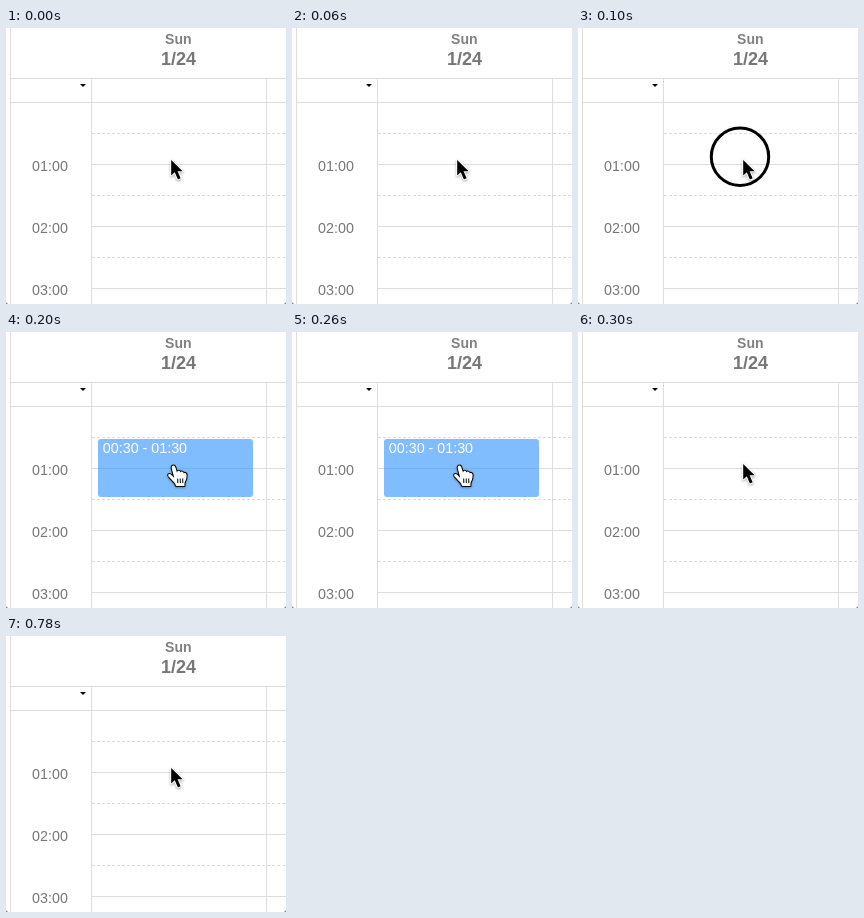
Write an HTML page with a canvas that moves like this. It is 280 px wide and 276 px high and loops after 1100 ms.

```html
<!DOCTYPE html>
<html lang="en">
<head>
<meta charset="utf-8">
<title>Calendar slot selection</title>
<style>
  html, body { margin: 0; width: 100%; height: 100%; overflow: hidden; background: #fff; }
  canvas { display: block; width: 280px; height: 276px; }
</style>
</head>
<body>
<canvas id="stage"></canvas>
<script>
const WIDTH = 280, HEIGHT = 276, LOOP = 1100, STEP = 100;
const FONT = '"Liberation Sans", Arial, sans-serif';
const canvas = document.getElementById('stage');
const ctx = canvas.getContext('2d');
const ratio = window.devicePixelRatio || 1;
canvas.width = WIDTH * ratio;
canvas.height = HEIGHT * ratio;
ctx.scale(ratio, ratio);

function line(x1, y1, x2, y2, color = '#dddddd', dash = []) {
  ctx.strokeStyle = color;
  ctx.lineWidth = 1;
  ctx.setLineDash(dash);
  ctx.beginPath();
  ctx.moveTo(x1, y1);
  ctx.lineTo(x2, y2);
  ctx.stroke();
  ctx.setLineDash([]);
}

function label(text, x, y, font, color, align = 'center') {
  ctx.font = `${font} ${FONT}`;
  ctx.fillStyle = color;
  ctx.textAlign = align;
  ctx.fillText(text, x, y);
}

function drawCalendar() {
  ctx.fillStyle = '#fff';
  ctx.fillRect(0, 0, WIDTH, HEIGHT);

  for (let hour = 0; hour < 4; hour++) {
    const y = 74.5 + hour * 62;
    line(hour ? 85 : 4, y, WIDTH, y);
    if (hour < 3) line(86, y + 31, WIDTH, y + 31, '#dddddd', [3, 2]);
    if (hour) label(`0${hour}:00`, 44, y + 6.5, '14.3px', '#777');
  }
  line(4, 50.5, WIDTH, 50.5);
  line(4.5, 0, 4.5, HEIGHT);
  line(85.5, 50, 85.5, HEIGHT);
  line(260.5, 50, 260.5, HEIGHT);

  label('Sun', 172.3, 16, 'bold 14px', '#808080');
  label('1/24', 172.5, 37, 'bold 18px', '#777');

  ctx.fillStyle = '#000';
  ctx.fill(new Path2D('M74 56h6l-3 3z'));
  ctx.fillStyle = '#888';
  ctx.fill(new Path2D('M0 274v2h2zM280 274v2h-2z'));
}

function drawShape(path, fill, stroke, width) {
  ctx.save();
  ctx.lineJoin = 'round';
  ctx.lineWidth = width;
  ctx.strokeStyle = stroke;
  ctx.shadowColor = 'rgba(0,0,0,.35)';
  ctx.shadowBlur = 2.5 * ratio;
  ctx.shadowOffsetY = ratio;
  ctx.stroke(path);
  ctx.shadowColor = 'transparent';
  ctx.fillStyle = fill;
  ctx.fill(path);
  ctx.restore();
}

const arrow = new Path2D('M165.2 132v15.6l3.6-3.3 3.1 7.2 2.7-1.2-3-7h5z');
const hand = new Path2D(
  'M168.3 146L166 137.5C164.7 133.3 168.2 131.9 169.4 135.5L171 140.5' +
  'C171.4 138.1 174.2 138.4 174.4 140.6C175.1 138.8 177.4 139.5 177.7 141.4' +
  'C179.2 140.2 180.7 141.2 180.6 143.3C180.6 147.2 179.4 148.7 178.6 150.8L178.4 154' +
  'H170.2C169.3 150.7 166.4 148.8 164.1 146.1C162.5 144.4 161.6 143.4 162.4 142.5' +
  'C164 141 166 143.5 168.3 146Z');

function drawArrow() {
  drawShape(arrow, '#000', '#fff', 2);
}

function drawHand() {
  drawShape(hand, '#fff', '#000', 2);
  for (const x of [171.7, 174.2, 176.7]) line(x, 146.5, x + .1, 151, '#000');
}

function drawPressRing() {
  ctx.strokeStyle = '#000';
  ctx.lineWidth = 3;
  ctx.beginPath();
  ctx.arc(162, 128.7, 28.7, 0, Math.PI * 2);
  ctx.stroke();
}

function drawEvent() {
  ctx.fillStyle = '#80bdff';
  ctx.beginPath();
  ctx.roundRect(92, 107, 155, 58, 3);
  ctx.fill();
  line(92, 136.5, 247, 136.5, '#75b0f0');
  label('00:30 - 01:30', 96.8, 121, '14.3px', '#fff', 'left');
}

function render(now) {
  const step = Math.floor((now % LOOP) / STEP);
  drawCalendar();
  if (step === 1) drawPressRing();
  if (step === 2) {
    drawEvent();
    drawHand();
  } else {
    drawArrow();
  }
}

let start;
function tick(now) {
  start ??= now;
  render(now - start);
  requestAnimationFrame(tick);
}
render(0);
requestAnimationFrame(tick);
</script>
</body>
</html>
```
